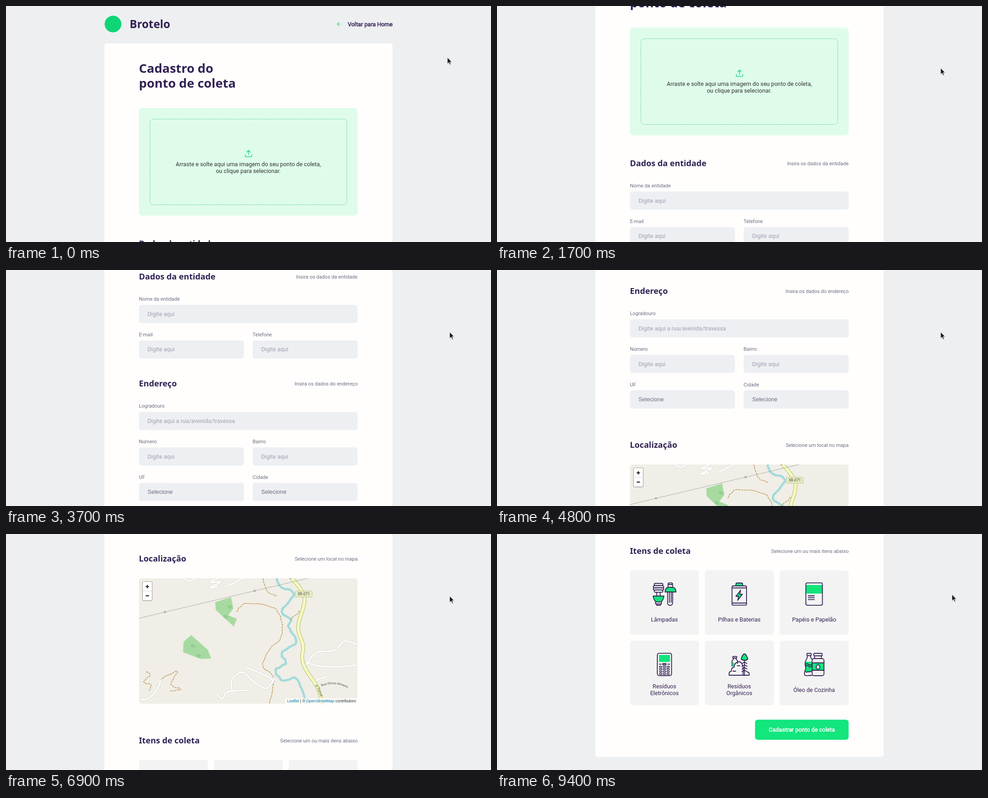
These frames come from a looping animation (1071 by 523 pixels, 9.9 s). An HTML page:

```html
<!DOCTYPE html>
<html lang="pt-BR">
<head>
<meta charset="utf-8">
<title>Cadastro do ponto de coleta</title>
<style>
  html, body { margin: 0; width: 100%; height: 100%; overflow: hidden; background: #edeff1; }
  svg { display: block; width: 100%; height: 100%; }
  text { font: 12.7px Roboto, Arial, sans-serif; white-space: pre; }
  .title { font: 700 27.5px "Noto Sans", "Open Sans", sans-serif; fill: #322153; }
  .brand { font-size: 24.4px; }
  .section { font-size: 18.2px; }
  .label { font-size: 11.1px; fill: #6c6c80; }
  .hint { fill: #a0a0b2; }
  .select { font-family: "Liberation Sans", Arial, sans-serif; fill: #6c6c80; }
  .dark { fill: #333; }
  .strong { stroke-width: .5px; }
  .ink { fill: #322153; stroke: #322153; }
  .mid { text-anchor: middle; }
  .end { text-anchor: end; }
  .field { fill: #edeff2; }
  .tile { fill: #f4f3f3; }
  .line { fill: none; stroke-linejoin: round; stroke-linecap: round; }
  .icon { fill: none; stroke: #322153; stroke-width: 1.8; stroke-linejoin: round; stroke-linecap: round; }
  .icon .g { fill: #10e57c; }
  .icon .p { fill: #f4f3f3; }
  .street { font: 6.8px "Open Sans", "Noto Sans", sans-serif; fill: #333; }
  .credit { font: 8.75px "Liberation Sans", Arial, sans-serif; fill: #333; }
  .credit tspan { fill: #0078a8; }
</style>
</head>
<body>
<svg id="stage" viewBox="0 0 1071 523" preserveAspectRatio="none"></svg>
<script>
const LEFT = 293.5, RIGHT = 776.5, FULL = RIGHT - LEFT;
const GUTTER = 19, HALF = (FULL - GUTTER) / 2, ROW = 78.7;

const text = (x, y, s, cls = '', extra = '') => `<text x="${x}" y="${y}" class="${cls}" ${extra}>${s}</text>`;
const rect = (x, y, w, h, rx = 0, extra = '') => `<rect x="${x}" y="${y}" width="${w}" height="${h}" rx="${rx}" ${extra}/>`;
const path = (d, extra = '') => `<path d="${d}" ${extra}/>`;
const stroke = (d, color, width, extra = '') => path(d, `class="line" stroke="${color}" stroke-width="${width}" ${extra}`);
const repeat = (n, fn) => Array.from({ length: n }, (_, i) => fn(i)).join('');

// Smooth curve through "x,y x,y ..." points, with an optional sideways ripple.
function curve(points, ripple = 0) {
  const pts = points.split(' ').map(p => p.split(',').map(Number));
  const at = i => pts[Math.max(0, Math.min(pts.length - 1, i))];
  const steps = 6, out = [];
  for (let n = 0; n <= (pts.length - 1) * steps; n++) {
    const i = Math.floor(n / steps), u = n / steps - i;
    const [a, b, c, d] = [at(i - 1), at(i), at(i + 1), at(i + 2)];
    const mix = k => b[k] + u / 2 * (c[k] - a[k] +
      u * (2 * a[k] - 5 * b[k] + 4 * c[k] - d[k] + u * (3 * (b[k] - c[k]) + d[k] - a[k])));
    out.push((mix(0) + ripple * Math.sin(n * 2.1)).toFixed(1) + ' ' + (mix(1) + ripple * Math.cos(n * 1.7)).toFixed(1));
  }
  return 'M' + out.join('L');
}

const section = (y, title, note) =>
  text(LEFT, y, title, 'title section') + text(RIGHT, y - 2.2, note, 'label end');

const field = (x, y, w, label, hint, cls) =>
  text(x, y - 9, label, 'label') + rect(x, y, w, 40.3, 6, 'class="field"') + text(x + 19, y + 24.6, hint, cls);

function form(y, title, note, rows) {
  const fields = rows.map(({ labels, hint = 'Digite aqui', cls = 'hint' }, r) => {
    const w = labels.length > 1 ? HALF : FULL;
    return labels.map((label, c) => field(LEFT + c * (HALF + GUTTER), y + 56 + r * ROW, w, label, hint, cls)).join('');
  });
  return section(y, title, note) + fields.join('');
}

function header() {
  return `<circle cx="236.3" cy="40" r="18.5" fill="#10d574"/>` +
    text(273, 49, 'Brotelo', 'title brand') +
    stroke('M739 40h-7.6m3.8 3.8l-3.8-3.8 3.8-3.8', '#2bd98a', 1.2) +
    text(853.7, 44.6, 'Voltar para Home', 'strong ink end');
}

function dropzone() {
  const center = LEFT + FULL / 2;
  return rect(LEFT, 226, FULL, 238.5, 8, 'fill="#dffcea"') +
    rect(317.8, 250.5, 434.8, 190, 8, 'fill="none" stroke="#4ecb93" stroke-dasharray="2.4 1.6"') +
    `<g transform="translate(526 317.5) scale(.795)">` +
    stroke('M21 15v4a2 2 0 0 1-2 2H5a2 2 0 0 1-2-2v-4M17 8l-5-5-5 5M12 3v12', '#1fdc86', 2) + '</g>' +
    text(center, 355, 'Arraste e solte aqui uma imagem do seu ponto de coleta,', 'mid dark') +
    text(center, 370.2, 'ou clique para selecionar.', 'mid dark');
}

function map() {
  const river = curve('597,96 606,117 636,132 609,172 629,189 624,206 641,239 609,263 618,286 595,302 612,325 642,321 664,378', 1);
  const highway = curve('627,93 659,141 645,205 656,247 654,275 662,300 688,341 699,380');
  const streets = [
    '660,294 685,263 724,258 748,237 778,246',
    '664,285 690,292 735,294 778,290',
    '499,346 499,322 522,306 545,326 575,342 594,318',
    '530,295 580,317 590,328',
    '465,353 478,365 490,350 533,346',
    '292,366 316,364 338,336 340,322',
    '388,96 405,104 420,97',
    '470,97 452,107 474,106 450,119 468,116',
    '487,116 526,97',
    '673,333 692,321 707,317',
  ].map(s => curve(s)).join('');
  const trails = [
    '567,98 577,127 597,137',
    '510,171 530,154 590,163 609,195 606,232 583,254 567,293 591,318 582,377',
    '628,190 650,170',
    '310,305 318,312 304,328 320,334 316,347',
    '340,323 378,304 364,333 386,344 362,348',
  ].map(s => curve(s, .9)).join('');
  const woods = [
    '462,151 497,140 502,165 491,180 510,188 503,205 482,186 463,168',
    '409,224 446,257 453,276 430,277 391,262 392,239',
  ].map(s => `<polygon points="${s}" fill="#a7daa0"/>`).join('');
  const tree = (x, y) => `<g fill="none" stroke="#79b779" stroke-width=".8" transform="translate(${x} ${y})">` +
    '<circle cx="-2" cy="-2" r="2"/><circle cx="2" cy="-1" r="2"/><path d="M-2 3v-3m4 4v-4"/></g>';
  const pylon = (x, y) => rect(x - 1.6, y - 1.6, 3.2, 3.2, 0, 'fill="#f0eee6" stroke="#777" stroke-width=".8"');

  return '<g transform="translate(0 1050)"><g clip-path="url(#mapClip)">' +
    rect(LEFT, 98, FULL, 278.5, 0, 'fill="#f0eee6"') +
    woods + tree(494, 162) + tree(485, 184) + tree(413, 249) + tree(425, 270) +
    stroke(river, '#a3dbdb', 5) +
    stroke(trails, '#b98b43', 1.3, 'stroke-dasharray="4 2.4"') +
    stroke(streets, '#cfcdc8', 4.6) + stroke(streets, '#fff', 3.4) +
    stroke(highway, '#a2a967', 8) + stroke(highway, '#f6fabb', 6.4) +
    stroke('M293 187L351 173 549 126 671 97', '#999', .8) +
    pylon(351, 173) + pylon(549, 126) + pylon(628, 97) +
    rect(639, 126.3, 37, 13.4, 1.5, 'fill="#e9edc4" stroke="#b3b783" stroke-width=".8"') +
    text(657.5, 136, 'XR-071', 'street mid', 'style="font-size:8.4px"') +
    '<text class="street"><textPath href="#lane">Rua Dorvo Almeno</textPath></text>' +
    '<text class="street" style="font-size:8px"><textPath href="#road">o Torvil</textPath></text>' +
    rect(616.5, 364, 160, 12.5, 0, 'fill="#fff" fill-opacity=".7"') +
    text(773, 373.3, '<tspan>Leaflet</tspan> | © <tspan>OpenStreetMap</tspan> contributors', 'credit end') +
    rect(300.8, 105, 22.6, 43.5, 3.5, 'fill="#000" fill-opacity=".3"') +
    rect(302, 106, 20.2, 41, 2, 'fill="#fff"') +
    stroke('M302 126.5h20.2', '#ccc', .8) +
    stroke('M308.4 116.5h7.4m-3.7-3.7v7.4M308.4 137h7.4', '#111', 1.8, 'style="stroke-linecap:butt"') +
    '</g></g>';
}

// Icons are drawn around the centre of a 50 px box.
const icons = {
  lamps: () =>
    repeat(4, i => rect(-24.5 + (i % 3 ? 0 : 2), -23.5 + i * 4.9, i % 3 ? 23 : 19, 4.9, 2.4)) +
    path('M-17-4v8m7.500-8v8') + path('M-25 4.500h24q-1 8-6 13h-12q-5-5-6-13z', 'class="g"') +
    path('M-19.500 18v4h13v-4M-17 22v3h8v-3') +
    path('M8-15v-7q0-2.500 2.500-2.500h5q2.500 0 2.500 2.500v7M8-21h10') +
    path('M1.500-4.500q0-10.500 10-10.500h4q10 0 10 10.500z', 'class="g"') +
    path('M7-4.500v24q0 5.500 5.600 5.500t5.600-5.500v-24M11-4.500v23m4-23v23'),
  battery: () =>
    rect(-7.5, -24.5, 15, 9, 3, 'class="g"') + rect(-16, -18, 32, 42.7, 2.5, 'class="p"') +
    path('M-16-13.500h32M-16 20h32') + path('M3-8.500L-7.500 5h6l-2 9L7 .5h-6z', 'class="g"'),
  paper: () =>
    rect(-18.2, -20, 36.5, 19, 0, 'class="g" stroke="none"') + rect(-18.2, -24.7, 36.5, 49.5, 3) +
    repeat(3, i => path(`M-13 ${4 + i * 4.2}h13.5`)),
  terminal: () =>
    rect(-15.7, -24.7, 31.5, 49.5, 4) + rect(-12, -21, 24.3, 15.5, 1, 'class="g" stroke="none"') +
    path('M-11-.5h4M-3.500-2h7v3h-7zM7.500-.5h4') +
    repeat(12, i => rect(-11 + (i % 3) * 8.2, 4 + Math.floor(i / 3) * 5.2, 5.5, 2.9, 1, 'stroke-width="1.4"')),
  organic: () =>
    path('M-16 4v-10q0-4 3-5v-5h6v5q3 1 3 5v4') + rect(-14.5, -17.5, 9, 3.5, 1, 'class="p"') +
    rect(-15.7, -4, 4, 8, 0, 'class="g" stroke="none"') +
    path('M-22.500 24v-4q0-4 5-5 0-8 6-9 1-10 8-11 5-3 9 3l3 8v18zh44.500v-3q0-4-4-4'.replace('zh', 'M-22.5 24h')) +
    path('M-14 15h6m4-12h5') +
    path('M4-12q4-11.500 7.500-11.500t7.500 11.500q-3 3-7.500 3t-7.500-3z', 'class="g"') +
    path('M11.500-9v32') + repeat(4, i => path(`M6 ${-2 + i * 6}l5.500-3 5.500 3`)),
  oil: () =>
    rect(-19.5, -6, 14, 23, 0, 'class="g" stroke="none"') +
    path('M-15-19.500q0 6-3 10-3 5-1.500 13 2 5 0 9-2.500 5-1.500 11 3 2.500 8 1h8M-8-19.500q0 5 3 8') +
    rect(-16, -24.5, 9.5, 5, 1.5) +
    repeat(2, i => path(`M-19.5 ${i * 4}q4-3 7 0t7 0`)) + path('M-18.500 17l12-1') +
    rect(-4.5, -13, 26.3, 38, 4.5, 'class="p"') + rect(-4.5, -3.5, 26.3, 16.5, 0, 'class="g"') +
    path('M1-13v-6m15 6v-6') + rect(-1, -24.5, 19, 5.5, 2) +
    path('M8.600-.5q-4 4.500-4 7a4 4 0 0 0 8 0q0-2.500-4-7z', 'fill="#fff"'),
};

function items() {
  const list = [
    ['lamps', 'Lâmpadas'], ['battery', 'Pilhas e Baterias'], ['paper', 'Papéis e Papelão'],
    ['terminal', 'Resíduos', 'Eletrônicos'], ['organic', 'Resíduos', 'Orgânicos'], ['oil', 'Óleo de Cozinha'],
  ];
  const tiles = list.map(([icon, ...lines], i) => {
    const x = LEFT + (i % 3) * 165.3, y = 80.5 + Math.floor(i / 3) * 156, center = x + 76.2;
    const base = y + 113 - (lines.length - 1) * 7.6;
    return rect(x, y, 152.4, 143, 6, 'class="tile"') +
      `<g class="icon" transform="translate(${center} ${y + 52.5})">${icons[icon]()}</g>` +
      lines.map((s, n) => text(center, base + n * 15.2, s, 'mid', 'fill="#322153"')).join('');
  }).join('');
  return `<g transform="translate(0 1470)">${tiles}` +
    rect(569.8, 411.5, 206.7, 44.5, 6, 'fill="#12e67d"') +
    text(673.2, 438.3, 'Cadastrar ponto de coleta', 'strong mid', 'fill="#fff" stroke="#fff"') + '</g>';
}

const stage = document.getElementById('stage');
stage.innerHTML = `<defs>
  <clipPath id="mapClip">${rect(LEFT, 98, FULL, 278.5, 6)}</clipPath>
  <path id="lane" d="M697 338Q724 325 760 344"/>
  <path id="road" d="M683 336Q690 346 697 372"/>
</defs>
<rect width="1071" height="523" fill="#edeff1"/>
<g id="page">` +
  header() + rect(217.3, 83, 636.3, 1881, 6, 'fill="#fffefd"') +
  text(LEFT, 148, 'Cadastro do', 'title') + text(LEFT, 181.3, 'ponto de coleta', 'title') +
  dropzone() +
  form(533, 'Dados da entidade', 'Insira os dados da entidade', [
    { labels: ['Nome da entidade'] },
    { labels: ['E-mail', 'Telefone'] },
  ]) +
  form(770.2, 'Endereço', 'Insira os dados do endereço', [
    { labels: ['Logradouro'], hint: 'Digite aqui a rua/avenida/travessa' },
    { labels: ['Número', 'Bairro'] },
    { labels: ['UF', 'Cidade'], hint: 'Selecione', cls: 'select' },
  ]) +
  section(1111, 'Localização', 'Selecione um local no mapa') + map() +
  section(1514, 'Itens de coleta', 'Selecione um ou mais itens abaixo') + items() +
`</g>
<g id="cursor">
  <path d="M1 2v14l3-3 2.400 5 2-1-2.300-4.800h4.300z" fill="#000" opacity=".15"/>
  <path d="M0 0v14l3.200-3 2.300 5 2.200-1-2.300-4.800h4.300z" fill="#1a1a1a" stroke="#fff" stroke-width=".8"/>
</g>`;

const page = document.getElementById('page'), cursor = document.getElementById('cursor');
const LOOP = 9900, STEP = 100, SWIPE = 650;

// Each swipe: the time it settles and the scroll offset it reaches.
const swipes = [
  [1500, 128], [2100, 268], [3000, 393], [3900, 555], [4800, 717],
  [5700, 850], [6500, 1000], [7300, 1140], [8100, 1305], [8900, 1470],
];

const progress = (t, from, to) => Math.max(0, Math.min(1, (t - from) / (to - from)));
const ease = p => (p + p * p * (3 - 2 * p)) / 2;

const scrollAt = t => swipes.reduce((y, [end, to]) => y + (to - y) * ease(progress(t, end - SWIPE, end)), 0);

function cursorAt(t) {
  const enter = progress(t, 300, 900), leave = progress(t, 9200, 9400);
  return [974.7 + 5 * enter + 25 * leave, 114 + 23.5 * enter - 3.5 * leave];
}

function draw(ms) {
  const t = Math.floor((ms % LOOP) / STEP) * STEP;
  page.setAttribute('transform', `translate(0 ${-scrollAt(t).toFixed(1)})`);
  cursor.setAttribute('transform', `translate(${cursorAt(t)})`);
}

const start = performance.now();
function tick() {
  draw(performance.now() - start);
  requestAnimationFrame(tick);
}
tick();
</script>
</body>
</html>
```
